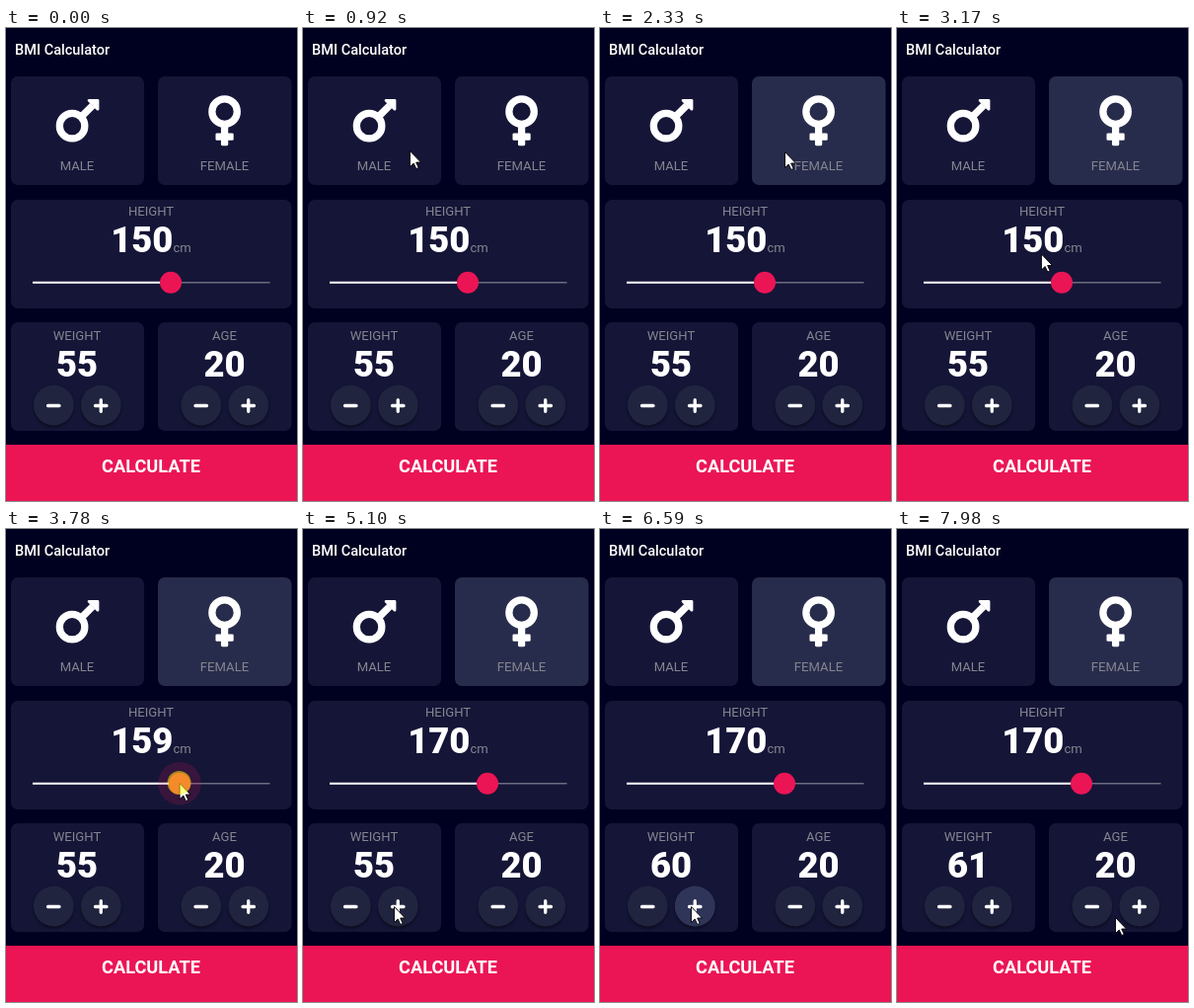
These frames come from a looping animation (295 px wide and 479 px high, 8000 ms). An HTML page:

```html
<!DOCTYPE html>
<html lang="en">
<head>
<meta charset="utf-8">
<title>BMI Calculator</title>
<style>
  html, body { margin: 0; width: 100%; height: 100%; overflow: hidden; background: #000020; }
  svg { display: block; width: 295px; height: 479px; font-family: Roboto, sans-serif; }
  text { fill: #fff; text-anchor: middle; }
  .label { font-size: 13.1px; fill: #85858f; }
  .number { font-size: 36.4px; font-weight: 900; }
  .card { fill: #151538; }
  .active { fill: #282c4c; }
  .round { fill: #20243f; filter: drop-shadow(0 2px 1.5px #0007); }
  .sign { stroke: #fff; stroke-width: 3.3; stroke-linecap: round; }
  .ring { fill: none; stroke: #fff; stroke-width: 64; }
</style>
</head>
<body>
<svg viewBox="0 0 295 479">
  <text x="9" y="27" style="text-anchor:start;font-size:14.56px;font-weight:500">BMI Calculator</text>

  <g class="card">
    <rect id="male" x="5" y="49" width="135" height="110" rx="7"/>
    <rect id="female" x="154" y="49" width="135.500" height="110" rx="7"/>
    <rect x="5" y="174" width="284.500" height="110" rx="7"/>
    <rect x="5" y="298" width="135" height="110" rx="7"/>
    <rect x="154" y="298" width="135.500" height="110" rx="7"/>
  </g>

  <g fill="#fff" transform="translate(50.7 64.600) scale(.1138)">
    <circle class="ring" cx="144" cy="304" r="112"/>
    <path class="ring" d="M230 218L326 122"/>
    <path d="M372 64h-79c-10.7 0-16 12.9-8.5 20.5l78.9 78.9c7.6 7.6 20.5 2.2 20.5-8.5V76c0-6.6-5.400-12-12-12z"/>
  </g>
  <g fill="#fff" transform="translate(205.2 64.600) scale(.1138)">
    <circle class="ring" cx="144" cy="176" r="112"/>
    <rect x="112" y="300" width="64" height="180" rx="12"/>
    <rect x="64" y="368" width="160" height="64" rx="12"/>
  </g>
  <text class="label" x="72" y="144">MALE</text>
  <text class="label" x="221.500" y="144">FEMALE</text>

  <text class="label" x="147" y="190">HEIGHT</text>
  <text x="147" y="227"><tspan class="number" id="height">150</tspan><tspan class="label">cm</tspan></text>
  <path d="M27 257.700H267.500" stroke="#6d6d80" stroke-width="1.5"/>
  <path id="track" stroke="#fff" stroke-width="2"/>
  <circle id="halo" cy="257.700" fill="#eb1555" fill-opacity=".16"/>
  <circle id="knob" cy="257.700" r="11" fill="#eb1555"/>

  <text class="label" x="72" y="316">WEIGHT</text>
  <text class="number" id="weight" x="72" y="353">55</text>
  <text class="label" x="221.500" y="316">AGE</text>
  <text class="number" x="221.500" y="353">20</text>
  <g class="round">
    <circle cx="48.300" cy="382" r="20.400"/>
    <circle cx="96.300" cy="382" r="20.400"/>
    <circle cx="197.800" cy="382" r="20.400"/>
    <circle cx="245.800" cy="382" r="20.400"/>
  </g>
  <circle id="lit" cx="96.300" cy="382" r="20.400" fill="#30355a"/>
  <path class="sign" d="M42.500 382.500h11.500M90.500 382.500h11.500m-5.750-5.750v11.500M192 382.500h11.500M240 382.500h11.500m-5.750-5.750v11.500"/>

  <rect y="422" width="295" height="57" fill="#eb1555"/>
  <text x="147" y="450" style="font-size:18.2px;font-weight:700">CALCULATE</text>

  <g id="pointer">
    <path d="M.5 .5V16.500L4.200 13 6.800 18.500 9.200 17.500 6.700 12H11.500Z" fill="#fff" stroke="#000" stroke-width=".9"/>
    <circle id="press" r="12" fill="#ff0" fill-opacity=".5"/>
  </g>
</svg>
<script>
const LOOP = 8000;
const $ = id => document.getElementById(id);
const set = (id, attrs) => { for (const k in attrs) $(id).setAttribute(k, attrs[k]); };
const clamp = v => Math.max(0, Math.min(1, v));

// Progress in n equal jumps, the first at a and the last at b
const steps = (t, a, b, n) => t < a ? 0 : Math.min(1, (Math.floor((t - a) / (b - a) * (n - 1)) + 1) / n);
const ease = p => p * p * (3 - 2 * p);

// Pointer legs: from, to, jumps, x, y, sideways bend
const legs = [
  [375, 980, 9, 103, 113, 0],
  [1850, 2000, 3, 187, 125, 0],
  [2710, 3400, 10, 167, 257, -75],
  [3620, 4090, 7, 187, 257, 0],
  [4642, 4930, 5, 94, 382, 0],
  [5100, 5101, 1, 92, 382, 0],
  [7680, 7830, 3, 219, 400, 0],
  [7980, 7981, 1, 221, 393, 0]
];
const drag = legs[3];
const plus = [5570, 6030, 6190, 6350, 6510, 6840].map(a => [a, a + 80]);
const presses = [[1530, 1700], [2170, 2250], [3550, 4570], ...plus];

function pointerAt(t) {
  let x = 248, y = 436;
  for (const leg of legs) {
    const [a, b, n, toX, toY, bend] = leg;
    if (t < a) break;
    const s = steps(t, a, b, n), p = leg === drag ? s : ease(s);
    x += (toX - x) * p + 2 * bend * p * (1 - p);
    y += (toY - y) * p;
  }
  return [x, y];
}

function glow(t, [down, up]) {
  if (t < down) return 0;
  return t < up ? 0.6 : clamp(1 - (t - up) / 200);
}

function draw(t) {
  const [x, y] = pointerAt(t);
  set('pointer', { transform: `translate(${x} ${y})`, visibility: t < 300 ? 'hidden' : 'visible' });
  set('press', { opacity: presses.some(([a, b]) => t >= a && t < b) ? 1 : 0 });
  set('male', { class: t >= 1770 && t < 2330 ? 'active' : 'card' });
  set('female', { class: t >= 2330 ? 'active' : 'card' });

  const height = Math.round(150 + 20 * steps(t, ...drag));
  const knobX = height + 17;
  $('height').textContent = height;
  set('track', { d: `M27 257.700H${knobX}` });
  set('knob', { cx: knobX });
  set('halo', { cx: knobX, r: 21.8 * clamp((t - 3500) / 100) * clamp((4640 - t) / 70) });

  $('weight').textContent = 55 + plus.filter(([, up]) => t >= up).length;
  set('lit', { opacity: Math.max(...plus.map(p => glow(t, p))) });
}

const start = performance.now();
function frame() {
  draw((performance.now() - start) % LOOP);
  requestAnimationFrame(frame);
}
frame();
</script>
</body>
</html>
```
